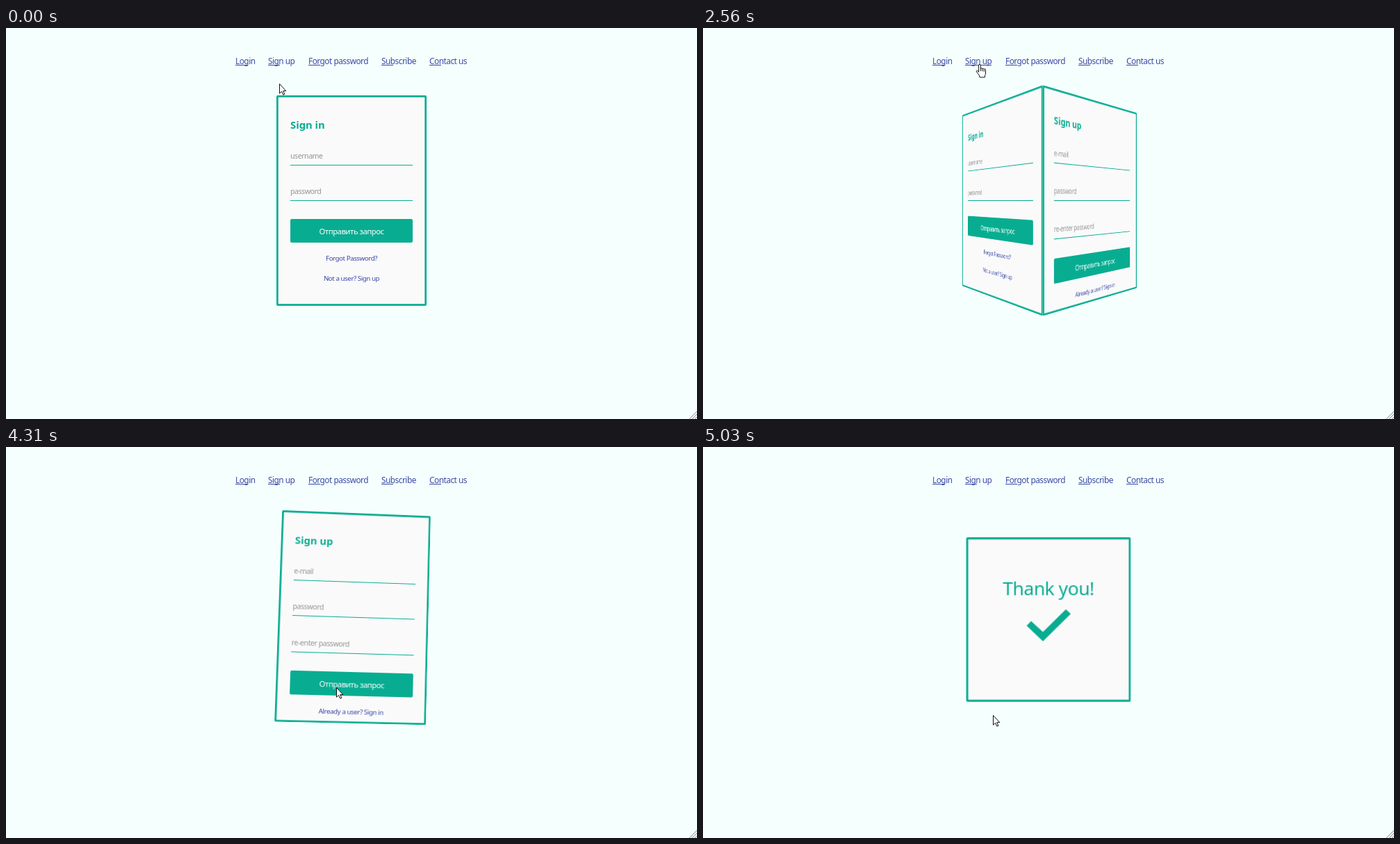
These frames come from a looping animation (994 by 563 pixels, 6.46 s). An HTML page:

```html
<!DOCTYPE html>
<html lang="en">
<head>
<meta charset="utf-8">
<title>Cube form</title>
<style>
  html, body { margin: 0; width: 100%; height: 100%; overflow: hidden; }
  body {
    --teal: #08ad91; --ink: #3a49a6;
    position: relative; background: #f5fffe;
    font: 10.6px "Noto Sans", sans-serif; letter-spacing: -.045em; white-space: nowrap;
  }
  /* zero line height: "top" is the middle of the text */
  p, nav a { position: absolute; margin: 0; line-height: 0; }
  nav a { top: 47px; font-size: 11.8px; color: var(--ink); }
  nav a::after {
    content: ""; position: absolute; left: 0; top: 6px;
    width: var(--line, 17px); height: 1px; background: var(--ink);
  }
  .scene { position: absolute; left: 389px; top: 97px; width: 216px; height: 303px; perspective: 500px; }
  .cube { position: absolute; inset: 0; transform-style: preserve-3d; }
  .face {
    position: absolute; inset: 0; background: #fafafa; border-radius: 2px;
    box-shadow: inset 0 0 0 2.7px var(--teal); backface-visibility: hidden;
  }
  .front { transform: translateZ(108px); }
  .right { transform: rotateY(90deg) translateZ(108px); }
  .bottom { inset: 43.5px 0; transform: rotateX(-90deg) translateZ(151.5px); }
  .title { left: 20px; top: 41.5px; font-size: 14.8px; font-weight: 700; letter-spacing: 0; color: var(--teal); }
  .field { left: 20px; width: 176px; color: #949494; }
  .field::after { content: ""; position: absolute; left: 0; top: 13px; width: 100%; height: 1px; background: var(--teal); }
  .button {
    left: 20px; width: 176px; height: 34px; line-height: 35px; font-size: 11.2px;
    text-align: center; color: #fff; background: var(--teal); border-radius: 2px;
  }
  .link { width: 100%; text-align: center; font-size: 9.8px; font-weight: 500; color: var(--ink); }
  .thanks { top: 67px; width: 100%; text-align: center; font-size: 24.2px; font-weight: 500; color: var(--teal); }
  svg { position: absolute; left: 0; top: 0; overflow: visible; }
</style>
</head>
<body>
<nav>
  <a style="left:330px">Login</a>
  <a style="left:377px" id="signUp">Sign up</a>
  <a style="left:435px">Forgot password</a>
  <a style="left:540px">Subscribe</a>
  <a style="left:609px">Contact us</a>
</nav>

<div class="scene"><div class="cube" id="cube">
  <div class="face front">
    <p class="title">Sign in</p>
    <p class="field" style="top:87px">username</p>
    <p class="field" style="top:138px">password</p>
    <p class="button" style="top:178px">Отправить запрос</p>
    <p class="link" style="top:235px">Forgot Password?</p>
    <p class="link" style="top:264px">Not a user? Sign up</p>
  </div>
  <div class="face right">
    <p class="title">Sign up</p>
    <p class="field" style="top:87px">e-mail</p>
    <p class="field" style="top:138px">password</p>
    <p class="field" style="top:190px">re-enter password</p>
    <p class="button" style="top:230px">Отправить запрос</p>
    <p class="link" style="top:287px">Already a user? Sign in</p>
  </div>
  <div class="face bottom">
    <p class="thanks">Thank you!</p>
    <svg width="216" height="216" viewBox="-108 -108 216 216">
      <path fill="#08ad91" d="M-28.7 7.9L-22.8 2L-7.3 16.2L22.8-13.5L29.2-7.6L-7.3 28.5Z"/>
    </svg>
  </div>
</div></div>

<svg width="994" height="563" stroke-linejoin="round">
  <path stroke="#888" d="M983 563L994 552M987 563L994 556M991 563L994 560"/>
  <g id="cursor" fill="#fff" stroke="#111">
    <path id="arrow" d="M.5 .5V14.2L3.6 11.4L5.8 16.2L7.8 15.3L5.7 10.6H9.8Z"/>
    <g id="hand" transform="translate(-5 0)">
      <path d="M4.6 11.5V1.8a1.4 1.4 0 0 1 2.8 0V6.6a1.3 1.3 0 0 1 2.5.3a1.3 1.3 0 0 1 2.4.6a1.2 1.2 0 0 1 2.2.7V13c0 2-1.2 3-1.2 6H6.2C6 16 3.5 14 1.6 11.2C.6 9.6 2.4 8.6 3.4 9.8Z"/>
      <path fill="none" d="M7.4 6.6V10M9.9 7V10.4M12.3 7.6V10.8"/>
    </g>
  </g>
</svg>

<script>
const LOOP = 6460, STEP = 50, TURN = 475;
const [signUp, cube, cursor, arrow, hand] =
  ['signUp', 'cube', 'cursor', 'arrow', 'hand'].map(id => document.getElementById(id));

// time, x, y of the pointer tip
const path = [
  [0, 393, 80], [10, 393, 80], [60, 397, 75], [1210, 397, 75], [1260, 397, 66],
  [1510, 397, 55], [1660, 397, 55], [1860, 397, 45], [2110, 397, 52], [3310, 397, 52],
  [3760, 473, 320], [3860, 475, 346], [4660, 475, 346], [5010, 417, 386], [LOOP, 417, 386]
];

const progress = (t, start, length) => Math.min(1, Math.max(0, (t - start) / length));
const turn = (t, start) => progress(t, start, TURN) ** 1.68;

function pointerAt(t) {
  const i = path.findIndex(key => key[0] > t);
  const [t0, x0, y0] = path[i - 1], [t1, x1, y1] = path[i];
  const k = (t - t0) / (t1 - t0);
  return [x0 + (x1 - x0) * k, y0 + (y1 - y0) * k];
}

function draw(now) {
  // the screen advances in steps of 50 ms
  const t = Math.max(0, Math.floor((now % LOOP - 10) / STEP) * STEP + 10);
  const hover = t >= 1710 && t < 3360;
  const line = progress(t, 1710, 200) - progress(t, 3310, 200);

  cursor.setAttribute('transform', `translate(${pointerAt(t)})`);
  arrow.style.display = hover ? 'none' : '';
  hand.style.display = hover ? '' : 'none';
  signUp.style.setProperty('--line', 17 + 21 * line + 'px');
  cube.style.transform = `translateZ(-108px) rotate3d(1,1,1,${120 * turn(t, 4257)}deg)
    rotateY(${-90 * turn(t, 2234)}deg)`;
}

let start;
function tick(now) {
  start ??= now;
  draw(now - start);
  requestAnimationFrame(tick);
}
draw(0);
requestAnimationFrame(tick);
</script>
</body>
</html>
```
